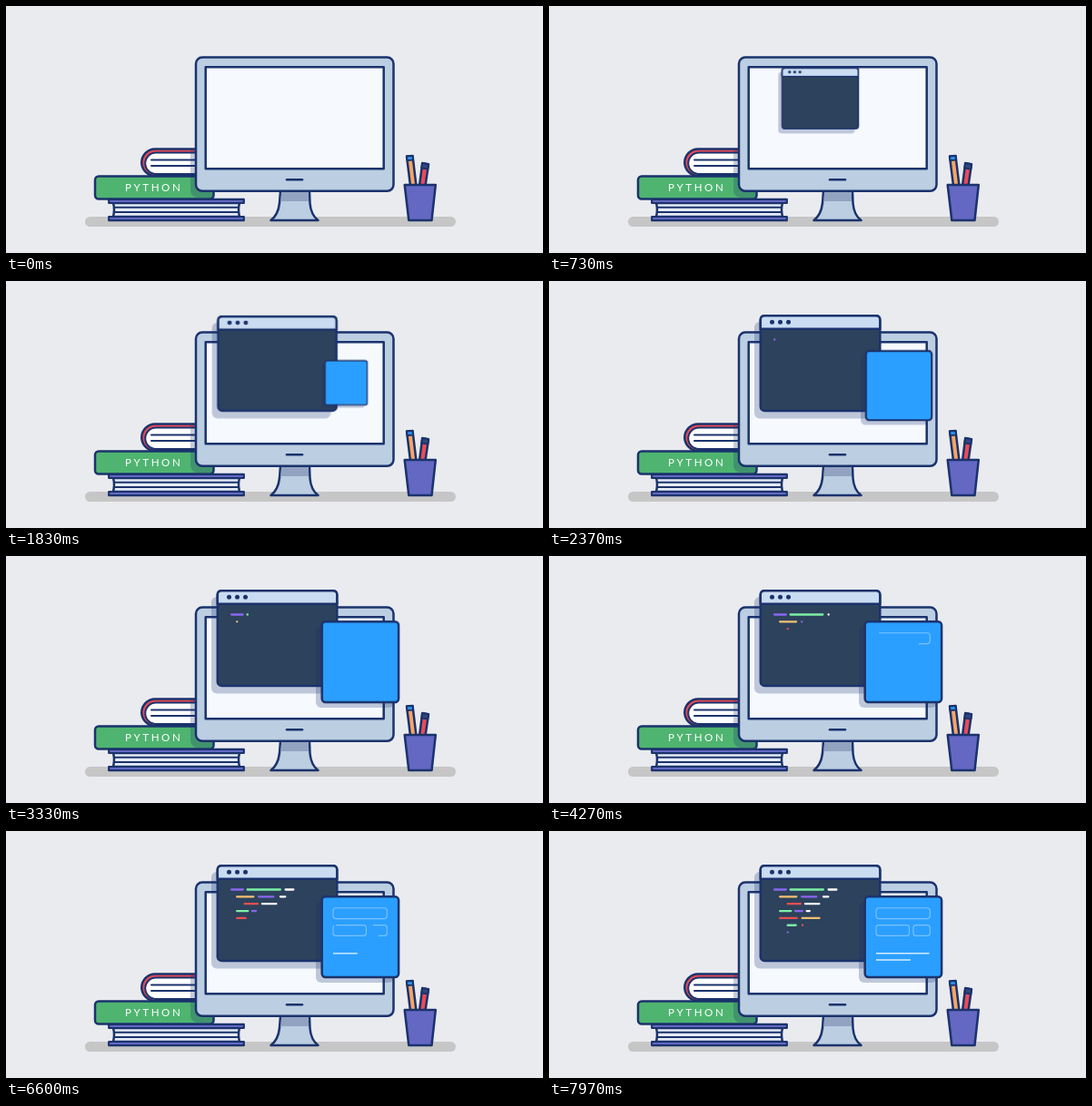
Animation, 591 px wide and 272 px high, one loop 8 s. Source, as an HTML page:

```html
<!DOCTYPE html>
<html lang="en">
<head>
<meta charset="utf-8">
<title>Desk with a computer</title>
<style>
  html, body { margin: 0; width: 100%; height: 100%; overflow: hidden; background: #e9ebef; }
  svg { display: block; width: 100%; height: 100%; }

  .ink { stroke: #1b336c; stroke-width: 2.5; stroke-linejoin: round; stroke-linecap: round; }
  .shade { fill: #1b336c; fill-opacity: .25; }
  .title { font: 11.6px Lato, sans-serif; letter-spacing: 2.6px; fill: #fff; }

  /* The script moves the paused animations along one shared loop. */
  .grow, .draw { animation: grow 2.2s cubic-bezier(.333, 1, .667, 1) var(--at) both paused; }
  .draw { animation-name: draw; fill: none; }
  .window { --at: 100ms; transform-origin: 298.5px 121px; }
  .card { --at: 1320ms; transform-origin: 355.5px 106.5px; }
  .code { animation-duration: 1.1s; animation-timing-function: ease-in-out; stroke-width: 2.3; stroke-linecap: round; }
  .field { stroke: #fff; stroke-opacity: .38; stroke-width: 1.1; }
  .note { stroke: #fff; stroke-opacity: .8; stroke-width: 1.4; }

  @keyframes grow { from { transform: scale(0); } to { transform: scale(1); } }
  @keyframes draw {
    from { stroke-dasharray: 0 2; opacity: 0; }
    .1% { opacity: 1; }
    to { stroke-dasharray: 1 2; opacity: 1; }
  }
</style>
</head>
<body>
<svg viewBox="0 0 591 272">
  <defs>
    <clipPath id="books"><path d="M150 158H209V187H228V212H98V187H150Z"/></clipPath>
  </defs>

  <rect x="87" y="232" width="408" height="11" rx="5.5" fill="#c6c6c6"/>

  <g class="ink">
    <path d="M118 217Q120 224 118 232H257Q255 224 257 217Z" fill="#e4ebf5"/>
    <path d="M119 221.7H256M119 226.9H256" fill="none" stroke-width="2"/>
    <rect x="113.2" y="212.8" width="148.6" height="4.2" fill="#6468c3" stroke-width="2.2"/>
    <rect x="113.2" y="232" width="148.6" height="4.2" fill="#6468c3" stroke-width="2.2"/>

    <path d="M215 157.5H164A14.7 14.7 0 0 0 164 187H215Z" fill="#ea4b57"/>
    <path d="M215 161.5H165A10.8 10.8 0 0 0 165 185H215Z" fill="#fff" stroke-width="2"/>
    <path d="M160 169.5H215M160 176H215" fill="none" stroke-width="2"/>

    <rect x="98" y="187.5" width="130.5" height="25" rx="4" fill="#4fb470"/>
  </g>
  <rect class="shade" x="203" y="64" width="217" height="147" rx="8" clip-path="url(#books)"/>
  <text class="title" x="131" y="204.3">PYTHON</text>

  <g class="ink">
    <path d="M302 204L301 217Q299.500 230 291.500 236H343.500Q335.500 230 334.500 217L334 204Z" fill="#bccee2"/>
    <path d="M303 205H333V215H302.500Z" fill="#92a3c2" stroke="none"/>
    <rect x="209" y="56.500" width="217.500" height="147.300" rx="7" fill="#bccee2"/>
    <rect x="219.700" y="67.300" width="196" height="112" fill="#f6faff"/>
    <path d="M309 191.200H326"/>

    <path d="M441 165.500L447.500 165L451.500 198H445Z" fill="#f7a565"/>
    <path d="M441 165.500L447.500 165L448 169.500L441.500 170Z" fill="#2b9fff" stroke-width="2"/>
    <path d="M458.200 173L465 174.300L461.500 198H455Z" fill="#ea4b57"/>
    <path d="M458.200 173L465 174.300L464.200 179.500L457.400 178.500Z" fill="#33477a" stroke-width="2"/>
    <path d="M438.700 197H472.800L468.500 236H443.300Z" fill="#6468c3"/>
  </g>

  <g class="grow window">
    <rect class="shade" x="226" y="45" width="132" height="106.500" rx="6"/>
    <rect class="ink" x="232.800" y="38.200" width="131.500" height="104.800" rx="4.500" fill="#2d425c"/>
    <path class="ink" d="M232.800 52.800V42.700Q232.800 38.200 237.300 38.200H359.800Q364.300 38.200 364.300 42.700V52.800Z" fill="#cadcf1"/>
    <g fill="#1b336c">
      <circle cx="245.500" cy="45.200" r="2.500"/>
      <circle cx="254.500" cy="45.200" r="2.500"/>
      <circle cx="263.500" cy="45.200" r="2.500"/>
    </g>
  </g>
  <g id="code"></g>

  <g class="grow card">
    <rect class="shade" x="341" y="78" width="86" height="89" rx="6"/>
    <rect class="ink" x="347.700" y="72.200" width="84.400" height="88.800" rx="4" fill="#2b9fff"/>
  </g>
  <rect class="draw field" pathLength="1" style="--at:3735ms" x="360" y="84.800" width="59.300" height="11.800" rx="3"/>
  <rect class="draw field" pathLength="1" style="--at:5020ms" x="360" y="103.600" width="36.500" height="11.800" rx="3"/>
  <rect class="draw field" pathLength="1" style="--at:6000ms" x="401" y="103.600" width="18.300" height="11.800" rx="3"/>
  <path class="draw note" pathLength="1" style="--at:6200ms" d="M360 134.800H419"/>
  <path class="draw note" pathLength="1" style="--at:6850ms" d="M360 142H403"/>
</svg>

<script>
  const LOOP = 8000, FIRST = 2345, STEP = 925;
  const colors = { p: '#8a67f0', g: '#7df0a5', w: '#ffffff', o: '#f5bf72', r: '#ea5050' };

  // Each row: color, left and right end of every segment.
  const rows = [
    [['p', 247, 262], ['g', 264.5, 303], ['w', 306.5, 317.5]],
    [['o', 253, 273.5], ['p', 277, 295.5], ['w', 300.8, 308.5]],
    [['r', 261.5, 278], ['w', 280.8, 298.5]],
    [['g', 253, 267.5], ['p', 269.8, 280], ['w', 282.5, 288]],
    [['r', 253, 274], ['o', 277.5, 299]],
    [['g', 261.5, 273], ['r', 277.8, 296]],
    [['p', 261.5, 275]]
  ];

  const code = document.getElementById('code');
  rows.forEach((row, r) => row.forEach(([color, left, right], i) => {
    const line = document.createElementNS(code.namespaceURI, 'path');
    line.setAttribute('class', 'draw code');
    line.setAttribute('pathLength', 1);
    line.setAttribute('d', `M${left + 1.15} ${64.5 + r * 7.85}H${right - 1.15}`);
    line.setAttribute('stroke', colors[color]);
    line.style.setProperty('--at', `${FIRST + (r + i) * STEP}ms`);
    code.append(line);
  }));

  const animations = document.getAnimations();
  const start = performance.now();
  function seek() {
    const time = Math.max(0, performance.now() - start) % LOOP;
    for (const animation of animations) animation.currentTime = time;
    requestAnimationFrame(seek);
  }
  seek();
</script>
</body>
</html>
```
